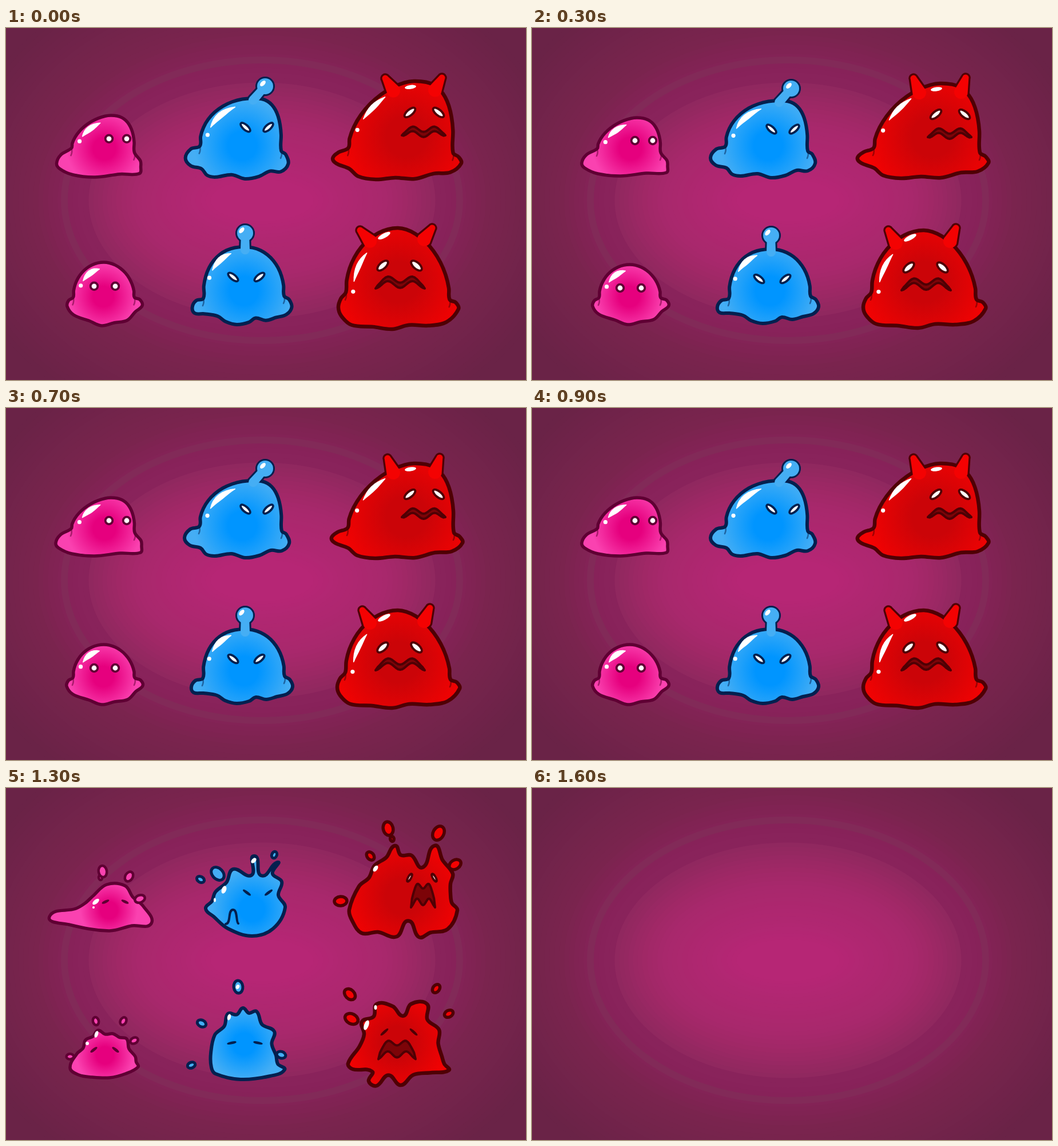
Write an HTML page that moves like this. It is 909 px wide and 616 px high and loops after 2.1 s.

```html
<!DOCTYPE html>
<html lang="en">
<head>
<meta charset="utf-8">
<title>Slimes</title>
<style>
html, body { margin: 0; width: 100%; height: 100%; overflow: hidden; background: #6a2347; }
svg { display: block; width: 100%; height: 100%; }
</style>
</head>
<body>
<svg viewBox="0 0 909 616" stroke-linejoin="round" stroke-linecap="round">
  <g id="back"></g>
  <g id="scene"></g>
</svg>
<script>
const $ = id => document.getElementById(id);
const mix = (a, b, u) => a + (b - a) * u;
const points = s => s.split(' ').map(p => p.split(',').map(Number));
const each = (list, draw) => (list || []).map(draw).join('');
const range = (n, f) => Array.from({ length: n + 1 }, (_, i) => f(i / n));

// Closed smooth curve; handles follow the chord between neighbours
function curve(p) {
  const at = i => p[(i + p.length) % p.length];
  const handle = (i, len) => {
    const [ax, ay] = at(i - 1), [bx, by] = at(i + 1), k = len / (Math.hypot(bx - ax, by - ay) || 1);
    return [at(i)[0] + (bx - ax) * k, at(i)[1] + (by - ay) * k];
  };
  return 'M' + p[0] + p.map((b, i) => {
    const c = at(i + 1), len = Math.hypot(c[0] - b[0], c[1] - b[1]) * .35;
    return `C${handle(i, len)} ${handle(i + 1, -len)} ${c}`;
  }).join('') + 'Z';
}
// Rounded bar from radius r to radius s
function taper([x, y, r], [u, v, s]) {
  const d = Math.hypot(u - x, v - y), nx = (y - v) / d, ny = (u - x) / d;
  return `M${x + nx * r},${y + ny * r}A${r} ${r} 0 0 1 ${x - nx * r},${y - ny * r}` +
    `L${u - nx * s},${v - ny * s}A${s} ${s} 0 0 1 ${u + nx * s},${v + ny * s}Z`;
}
const path = (d, fill, line = 'none', w = 0) =>
  `<path d="${d}" fill="${fill}" stroke="${line}" stroke-width="${w}"/>`;
const oval = ([x, y, rx, ry = rx, turn = 0], fill, line = 'none', w = 0) =>
  `<ellipse cx="${x}" cy="${y}" rx="${rx}" ry="${ry}" transform="rotate(${turn} ${x} ${y})" ` +
  `fill="${fill}" stroke="${line}" stroke-width="${w}"/>`;

const skins = {
  pink: { edge: '#fa42b0', core: '#e6007e', line: '#5f0033', w: 5.5 },
  blue: { edge: '#45aef4', core: '#0095ff', line: '#04204f', w: 6 },
  red: { edge: '#f40202', core: '#cb0408', line: '#4f0004', w: 6.5 }
};

// dome: three key points and the roundness of each side (1 = ellipse, less = boxier)
// skirt: right lobe, hem, left lobe. glow: x, y, r. shine: from and to degrees, inset
// eyes: mid x, y, gap, rx, ry, turn. mouth: x, y, width, arch, wave, gape
// rim: x, y and an optional dent before the next point. drops: x, y, r
const slimes = [
  {
    skin: 'pink', glow: [172, 211, 66],
    dome: { left: [114, 211], top: [183, 157], right: [225, 218], bend: [1.18, .79] },
    skirt: '236,232 237,241 235,253 200,254 155,259 115,255 92,245 87,236 95,222',
    shine: [29, 68, .84], eyes: [195.5, 197, 31, 6.3, 6.3, 0],
    burst: {
      glow: [180, 214, 50],
      rim: '76,225 122,211,2 152,189 176,169 208,171,3 240,207 254,237 220,241 180,250 110,239',
      drops: '165,157,4 169,146,10 215,155,9 234,194,9',
      lids: [191, 199, 34, 5, .5, -25], glints: [[157, 199, 7, 3.5, -40], [153, 209, 2]]
    }
  },
  {
    skin: 'blue', glow: [413, 206, 84],
    dome: { left: [338, 207], top: [432, 127], right: [482, 215], bend: [.98, .72] },
    skirt: '490,221 495,237 482,250 463,249 443,258 418,262 394,255 365,259 350,256 340,245 321,240 312,227 322,212',
    knob: [453, 106], neck: [432, 130],
    shine: [26, 68, .88], eyes: [438.5, 177, 40, 10.5, 4.4, 42], glints: [[449, 101, 6, 3.5, -45]],
    burst: {
      glow: [430, 212, 72],
      rim: '349,211,3 366,182,5 397,142,26 434,119,30 475,130,13 482,164,9 488,209 467,246 430,259 388,246 363,225',
      drops: '370,150,13 340,160,7 469,117,6', lids: [440, 183, 38, 6.5, .5, 36],
      extra: 'M384,238C394,238 387,213 397,213C405,213 402,235 406,237',
      glints: [[433, 127, 5.5, 3.5, -45], [381, 178, 4, 7, 20], [365, 196, 2, 3.5]]
    }
  },
  {
    skin: 'red', glow: [700, 190, 118],
    dome: { left: [597, 210], top: [713, 97], right: [783, 218], bend: [1.2, .72] },
    skirt: '793,225 798,236 779,251 750,253 715,262 680,260 645,263 614,258 598,245 575,236 569,227 580,217',
    horns: [[[667, 88], [677, 113]], [[758, 87], [750, 112]]],
    shine: [32, 58, .93], eyes: [731, 151, 50, 11.5, 5, -40], mouth: [692, 186, 76, 6, 5, 9],
    glints: [[707, 107, 10, 3.5, -8]],
    burst: {
      glow: [695, 190, 105],
      rim: '600,213 617,172,5 644,136,4 680,101,9 709,118 728,139 749,101,2 781,150,2 777,185,4 789,214 772,247 742,253 722,261,28 683,260 650,252 622,254 605,232',
      drops: '675,89,4.5 668,71,12 756,79,13 637,119,8 785,134,11 585,198,11',
      eyes: [727, 157, 43, 7.5, 2.6, -60], mouth: [708, 203, 42, 33, 6, 29], glints: [[646, 141, 3.5, 6, 35]]
    }
  },
  {
    skin: 'pink', glow: [170, 470, 60],
    dome: { left: [117, 472], top: [171, 414], right: [225, 472], bend: [1, 1.04] },
    skirt: '235,476 239,486 227,496 213,510 190,514 167,519 145,511 117,501 106,487 109,477',
    shine: [35, 80, .82], eyes: [172.5, 455, 37, 6.3, 6.3, 0],
    burst: {
      glow: [173, 468, 50],
      rim: '112,490 124,465,4 139,441,3 161,424,4 187,430,2 211,439,4 226,470,1 231,488 209,500 181,507 150,506 127,502',
      drops: '157,408,7 205,408,7 224,442,7 112,470,6.5',
      lids: [172.5, 458, 38, 5.5, .5, -38], glints: [[158, 431, 3, 6, 20], [142, 447, 3]]
    }
  },
  {
    skin: 'blue', glow: [416, 460, 84],
    dome: { left: [344, 473], top: [417, 387], right: [487, 469], bend: [.88, .95] },
    skirt: '496,475 501,488 492,500 474,505 455,510 437,506 425,513 403,517 383,512 369,503 345,499 328,498 324,488 331,477',
    knob: [418, 363], neck: [418, 392],
    shine: [34, 72, .91], eyes: [420, 439, 46, 10.5, 4.4, 39], glints: [[412, 358, 6, 3.5, -50]],
    burst: {
      glow: [416, 448, 64],
      rim: '358,464 365,432,6 388,395,7 414,385,6 438,391,8 469,426,6 472,468,5 487,493 462,504 410,510 366,500 359,489',
      drops: '406,348,11 342,412,8 481,467,8 324,485,7',
      lids: [417.5, 446, 46, 6.5, .5, -12], glints: [[390, 401, 3, 5.5, 15], [405, 348, 4, 3, -60]]
    }
  },
  {
    skin: 'red', glow: [686, 445, 118],
    dome: { left: [593, 463], top: [685, 354], right: [777, 475], bend: [1.03, 1.12] },
    skirt: '788,480 793,491 772,513 740,519 705,518 675,525 640,521 602,518 584,503 579,488 584,473',
    horns: [[[623, 354], [636, 376]], [[741, 350], [731, 373]]],
    shine: [12, 46, .86], eyes: [688, 419, 59, 11.5, 5.5, -42], mouth: [646, 453, 86, 10, 6, 9],
    glints: [[661, 367, 12, 4, -28]],
    burst: {
      glow: [684, 445, 92],
      rim: '598,482 618,452,6 622,409,10 648,378 676,382,19 708,378 736,378,11 757,423,4 762,470,2 774,494 745,498 712,502 690,520,18 648,521 634,513 640,496 606,492',
      drops: '601,361,11 752,351,8 774,395,8 604,404,12',
      lids: [687, 427, 51, 7, .5, -42], mouth: [651, 469, 65, 24, 5.5, 21],
      glints: [[646, 384, 2.5, 4], [630, 415, 4, 9, 20]]
    }
  }
];

// Point on a dome: 0 degrees is the left notch, 90 the top, 180 the right notch
function onDome({ left, top, right, bend }, deg, inset = 1) {
  const side = deg <= 90 ? 0 : 1, foot = side ? right : left, a = deg * Math.PI / 180;
  const power = v => Math.max(0, v) ** bend[side] * inset;
  return [top[0] + (foot[0] - top[0]) * power(Math.abs(Math.cos(a))),
    foot[1] + (top[1] - foot[1]) * power(Math.sin(a))];
}

function mouth([x, y, w, arch, wave, gape], line) {
  const lip = (u, open) => [x + w * u,
    y + wave * Math.cos(4 * Math.PI * u) + (open - arch) * Math.abs(Math.sin(Math.PI * u)) ** .4];
  const d = [...range(24, u => lip(u, 0)), ...range(24, u => lip(1 - u, gape))];
  return path('M' + d.join('L') + 'Z', '#7c0408', line, 4);
}

const pair = ([x, y, gap, rx, ry, turn], fill, line) => [-1, 1].map(side =>
  oval([x + side * gap / 2, y, rx, ry, -side * turn], fill, line, 3.8)).join('');

const face = (o, line) => (o.eyes ? pair(o.eyes, '#fff', line) : '') +
  (o.lids ? pair(o.lids, line, line) : '') + (o.mouth ? mouth(o.mouth, line) : '');

const glow = (id, skin, [x, y, r]) =>
  `<radialGradient id="${id}" gradientUnits="userSpaceOnUse" cx="${x}" cy="${y}" r="${r}">` +
  `<stop offset=".3" stop-color="${skin.core}"/><stop offset="1" stop-color="${skin.edge}"/></radialGradient>`;

const SAG = 4, LIFT = -2, SPREAD = .03;

// k runs from -1 (tall) to 1 (squashed)
function idle(s, i, k, stretch) {
  const skin = skins[s.skin], { left, top, right } = s.dome, foot = (left[1] + right[1]) / 2;
  const skirt = points(s.skirt), base = Math.max(...skirt.map(p => p[1])), mid = (left[0] + right[0]) / 2;
  const warp = ([x, y, ...rest]) => {
    const u = Math.max(0, (y - top[1]) / (base - top[1]));
    return [x + k * SPREAD * u * u * (x - mid), y + k * mix(SAG, LIFT, u), ...rest];
  };
  const body = [...range(16, u => onDome(s.dome, u * 180)), ...skirt].map(warp);

  const parts = (s.horns || []).map(([[x, y], root]) =>
    taper([x - Math.sign(x - mid) * 4 * k, y, 5.5], warp([...root, 12])));
  if (s.knob) {
    const [x, y] = warp(s.knob);
    parts.push(taper([x, y, 7], warp([...s.neck, 8])), taper([x, y, 14], [x, y + .1, 14]));
  }

  const [from, to, inset] = s.shine, thick = 4.5 / (foot - top[1]);
  const edge = (u, side) => warp(onDome(s.dome, mix(from, to, u), inset + side * thick * Math.sin(Math.PI * u)));
  const streak = [...range(8, u => edge(u, 1)), ...range(8, u => edge(1 - u, -1))];
  const crease = [left, right].map(p => `M${warp(p)}q2,7 -1,13`).join('');

  return glow('g' + i, skin, s.glow) +
    `<g transform="translate(0 ${base}) scale(1 ${stretch}) translate(0 ${-base})">` +
    each(parts, d => path(d, skin.edge, skin.line, skin.w)) +
    path(curve(body), `url(#g${i})`, skin.line, skin.w) +
    each(parts, d => path(d, skin.edge, skin.edge, .5 - skin.w < 0 ? 0 : 0)) +
    `<g opacity=".5">${path(crease, 'none', skin.line, 2.6)}</g>` +
    path('M' + streak.join('L') + 'Z', '#fff', '#fff', 1.5) +
    oval(warp([...onDome(s.dome, from - 11, inset), 3.6]), '#fff') +
    each(s.glints, g => oval(warp(g), '#fff')) +
    `<g transform="translate(0 ${k * SAG * .8})">${face(s, skin.line)}</g></g>`;
}

// Key points with a dent pushed in, square to the edge, where one is given
const dented = rim => rim.flatMap(([x, y, dent], i) => {
  const [u, v] = rim[(i + 1) % rim.length], d = Math.hypot(u - x, v - y);
  return dent ? [[x, y], [(x + u) / 2 - (v - y) / d * dent, (y + v) / 2 + (u - x) / d * dent]] : [[x, y]];
});

// The burst sinks into a puddle while its drops fly out and fall
function burst(s, i, step) {
  const skin = skins[s.skin], o = s.burst, [cx, cy, r] = o.glow;
  const rim = dented(points(o.rim)), base = Math.max(...rim.map(p => p[1]));
  const wide = 1 + .3 * step - .17 * step * step, tall = .45 ** step, fall = step * step / 5;
  const put = ([x, y]) => [cx + (x - cx) * wide, base + (y - base) * tall];
  const drop = ([x, y, size]) => {
    const turn = Math.atan2(y - cy, x - cx) * 180 / Math.PI, d = size * (1 - step / 4);
    return oval([x + (x - cx) * step * .06, mix(y, base, fall), d, d * .72, turn], skin.edge, skin.line, skin.w - 1);
  };
  return glow('g' + i, skin, [...put([cx, cy]), r]) +
    path(curve(rim.map(put)), `url(#g${i})`, skin.line, skin.w) +
    each(points(o.drops), drop) +
    (step ? '' : each(o.glints, g => oval(g, '#fff')) + face(o, skin.line) +
      (o.extra ? path(o.extra, 'none', skin.line, 4) : ''));
}

function drawBack() {
  const stops = [[540, 0x6a2347], [400, 0x7a244e], [340, 0x872259], [304, 0x8a235c],
    [303, 0x90285f], [255, 0xa02866], [220, 0xa8286c], [90, 0xb62675]];
  const ring = rx => [447.5, 301.5, rx, rx - 108 * (1 - Math.exp(-rx / 132))];
  const blend = (a, b, u) => `rgb(${[16, 8, 0].map(n => Math.round(mix(a >> n & 255, b >> n & 255, u)))})`;
  $('back').innerHTML = each(stops, ([rx, c], i) => {
    const [to, next] = stops[i + 1] || [rx, c], n = Math.ceil((rx - to) / 9) || 1;
    return each(range(n, u => u).slice(0, n), u => oval(ring(mix(rx, to, u)), blend(c, next, u)));
  }) + oval(ring(345.5), 'none', '#822a58', 12);
}
drawBack();

const STEP = 100, LOOP = 2100, HIT = 12, POP = 13, GONE = 16;
let shown = -1;

function render(t) {
  const n = Math.floor(t % LOOP / STEP);
  if (n === shown) return;
  shown = n;
  const k = -Math.round(Math.cos(n * Math.PI / 2));
  $('scene').innerHTML = n >= GONE ? '' : each(slimes, (s, i) =>
    n < POP ? idle(s, i, k, n === HIT ? 1.04 : 1) : burst(s, i, n - POP));
}

const start = performance.now();
function tick() {
  render(performance.now() - start);
  requestAnimationFrame(tick);
}
tick();
</script>
</body>
</html>
```
